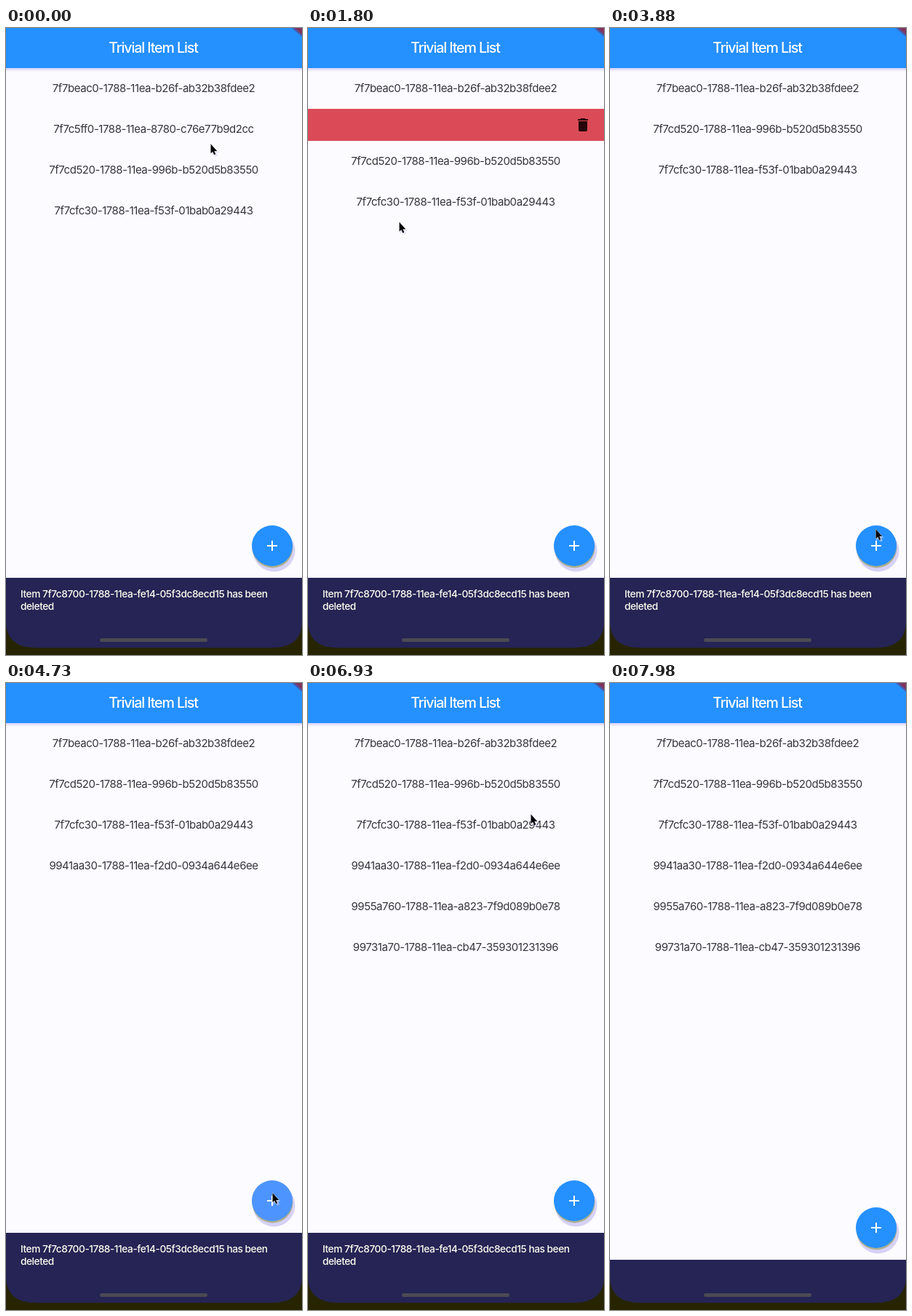
Animation of 407x861 px, one loop 8 s. Source, as an HTML page:

```html
<!DOCTYPE html>
<html lang="en">
<head>
<meta charset="utf-8">
<title>Trivial Item List</title>
<style>
  html, body { margin: 0; width: 100%; height: 100%; overflow: hidden; background: #fcfbff; }
  svg { display: block; width: 100%; height: 100%; }
  text { font-family: Inter, Roboto, "Liberation Sans", sans-serif; }
  .title { font-size: 19.6px; font-weight: 500; letter-spacing: -1.1px; fill: #fff; text-anchor: middle; }
  .item { font-size: 15px; letter-spacing: -.45px; fill: #36353a; text-anchor: middle; }
  .note { font-size: 13.7px; font-weight: 500; letter-spacing: -.45px; fill: #fffff0; }
</style>
</head>
<body>
<svg viewBox="0 0 407 861">
  <defs>
    <linearGradient id="edge" x2="0" y2="1">
      <stop stop-color="#d2d0f6"/><stop offset="1" stop-color="#fcfbff"/>
    </linearGradient>
    <filter id="soft" x="-20%" y="-20%" width="140%" height="140%"><feGaussianBlur stdDeviation=".7"/></filter>
    <clipPath id="reveal"><rect id="revealBox" y="111" width="407"/></clipPath>
    <clipPath id="button"><circle cx="366" cy="711" r="28"/></clipPath>
  </defs>

  <rect width="407" height="861" fill="#fcfbff"/>
  <g id="swipeBack" clip-path="url(#reveal)">
    <rect y="111" width="407" height="56" fill="#db4b57"/>
    <path id="bin" fill="#260407" d="M6 19c0 1.1.9 2 2 2h8c1.1 0 2-.9 2-2V7H6zM19 4h-3.5l-1-1h-5l-1 1H5v2h14z"/>
  </g>
  <g id="list"></g>

  <rect y="55" width="407" height="5" fill="url(#edge)"/>
  <rect width="407" height="55" fill="#2590ff"/>
  <text class="title" x="202.5" y="34">Trivial Item List</text>
  <path d="M393 0H407V12Z" fill="#4a5aa8"/>
  <path d="M397 0H407V9Z" fill="#80355c"/>

  <g id="fab">
    <circle cx="368.5" cy="717.5" r="29" fill="#d6d2f6" filter="url(#soft)"/>
    <circle cx="366.5" cy="713.5" r="28" fill="#aeb08f" filter="url(#soft)"/>
    <circle cx="366" cy="711" r="28" fill="#2590ff"/>
    <g id="ripples" clip-path="url(#button)"></g>
    <path d="M359 711H373M366 704V718" stroke="#fff" stroke-width="2"/>
  </g>

  <g id="snack">
    <rect y="755" width="407" height="106" fill="#252455"/>
    <g id="note">
      <text class="note" x="20" y="782">Item 7f7c8700-1788-11ea-fe14-05f3dc8ecd15 has been</text>
      <text class="note" x="20" y="799">deleted</text>
    </g>
  </g>
  <path d="M0 815C0 839 14 851 42 851H365C393 851 407 839 407 815V861H0Z" fill="#272500"/>
  <rect x="129" y="838" width="148" height="5" rx="2.5" fill="#4b4a52"/>

  <g id="cursor">
    <g transform="translate(.5 .3) scale(.86 .92)">
      <path d="M1 2V17L5 14L8 19L11 17L9 13H13Z" fill="#d6d2f6" opacity=".6" filter="url(#soft)"/>
      <path d="M0 0V14.2L3.2 11.4L5.4 16.3L7.8 15.2L5.7 10.6H10.2Z" fill="#050508" stroke="#fff" stroke-width=".9" paint-order="stroke"/>
    </g>
  </g>
</svg>
<script>
const LOOP = 8000, ROW = 56;
const $ = id => document.getElementById(id);

function add(parent, tag, attrs, text = '') {
  const el = document.createElementNS('http://www.w3.org/2000/svg', tag);
  for (const key in attrs) el.setAttribute(key, attrs[key]);
  el.textContent = text;
  parent.append(el);
  return el;
}

const clamp = v => Math.min(1, Math.max(0, v));
const span = (t, from, to) => clamp((t - from) / (to - from));

// CSS-style cubic Bézier easing, solved by bisection
function bezier(x1, y1, x2, y2) {
  const at = (a, b, s) => 3 * a * s * (1 - s) ** 2 + 3 * b * s * s * (1 - s) + s ** 3;
  return x => {
    let lo = 0, hi = 1;
    for (let i = 0; i < 24; i++) {
      const mid = (lo + hi) / 2;
      if (at(x1, x2, mid) < x) lo = mid; else hi = mid;
    }
    return at(y1, y2, lo);
  };
}
const ease = bezier(.25, .1, .25, 1);
const fastOutSlowIn = bezier(.4, 0, .2, 1);

// Monotone cubic curve through [time, ...values] keys
function track(keys, t, n = 1) {
  const last = keys.length - 1;
  if (t <= keys[0][0]) return keys[0][n];
  if (t >= keys[last][0]) return keys[last][n];
  const i = keys.findIndex(k => k[0] > t) - 1;
  const slope = j => (keys[j + 1][n] - keys[j][n]) / (keys[j + 1][0] - keys[j][0]);
  const tangent = j => {
    if (j === 0 || j === last) return 0;
    const a = slope(j - 1), b = slope(j);
    return a * b <= 0 ? 0 : 2 * a * b / (a + b);
  };
  const [t0, t1] = [keys[i][0], keys[i + 1][0]];
  const d = t1 - t0, s = (t - t0) / d, r = 1 - s;
  return keys[i][n] * r * r * (1 + 2 * s) + keys[i + 1][n] * s * s * (3 - 2 * s)
    + d * s * r * (tangent(i) * r - tangent(i + 1) * s);
}

const pointer = [
  [20, 281, 159], [430, 317, 145], [680, 317, 145], [1100, 200, 155],
  [1300, 125, 166], [1540, 118, 167], [1800, 125, 266], [2260, 216, 344],
  [2360, 216, 344], [2820, 297, 630], [3000, 297, 630], [3440, 363, 679],
  [3620, 363, 679], [3880, 365, 688], [4160, 366, 700], [5310, 366, 700],
  [5450, 330, 601], [6110, 290, 341], [6210, 290, 341], [6260, 306, 233],
  [6510, 306, 233], [6930, 306, 180], [7300, 420, 300]
];
const swipe = [[680, 0], [1250, -190], [1440, -407]];
const presses = [4490, 4750, 5130];

const items = [
  ['7f7beac0-1788-11ea-b26f-ab32b38fdee2', 0],
  ['7f7c5ff0-1788-11ea-8780-c76e77b9d2cc', 0],
  ['7f7cd520-1788-11ea-996b-b520d5b83550', 0],
  ['7f7cfc30-1788-11ea-f53f-01bab0a29443', 0],
  ['9941aa30-1788-11ea-f2d0-0934a644e6ee', 4560],
  ['9955a760-1788-11ea-a823-7f9d089b0e78', 4822],
  ['99731a70-1788-11ea-cb47-359301231396', 5208]
].map(([id, born]) => ({ born, el: add($('list'), 'text', { class: 'item' }, id) }));
const ripples = presses.map(start => ({
  start, el: add($('ripples'), 'circle', { cx: 366, cy: 711, fill: '#c8a0ff' })
}));

const move = (el, x, y) => el.setAttribute('transform', `translate(${x} ${y})`);
const show = (el, on) => el.setAttribute('visibility', on ? 'visible' : 'hidden');

function draw(t) {
  const dx = track(swipe, t);
  const height = Math.round(ROW * (1 - ease(span(t, 1741, 2101))));

  items.forEach(({ born, el }, i) => {
    show(el, t >= born && !(i === 1 && dx <= -407));
    move(el, 203 + (i === 1 ? dx : 0), 88 + i * ROW - (i > 1 ? ROW - height : 0));
  });
  show($('swipeBack'), dx < 0 && height > 0);
  $('revealBox').setAttribute('x', 407 + dx);
  $('revealBox').setAttribute('height', height);
  move($('bin'), 366, 99 + height / 2);

  for (const { start, el } of ripples) {
    const age = t - start;
    el.setAttribute('r', 29 * ease(clamp(age / 300)));
    el.setAttribute('opacity', age < 0 ? 0 : .28 * clamp(1 - (age - 200) / 400));
  }

  const open = 1 - span(t, 7690, 8190);
  const drop = Math.round(106 * (1 - fastOutSlowIn(open)));
  move($('snack'), 0, drop);
  move($('fab'), 0, drop);
  $('note').setAttribute('opacity', fastOutSlowIn(span(open, .72, 1)));

  move($('cursor'), track(pointer, t, 1), track(pointer, t, 2));
}

const begin = performance.now();
function tick() {
  draw((performance.now() - begin) % LOOP);
  requestAnimationFrame(tick);
}
tick();
</script>
</body>
</html>
```
